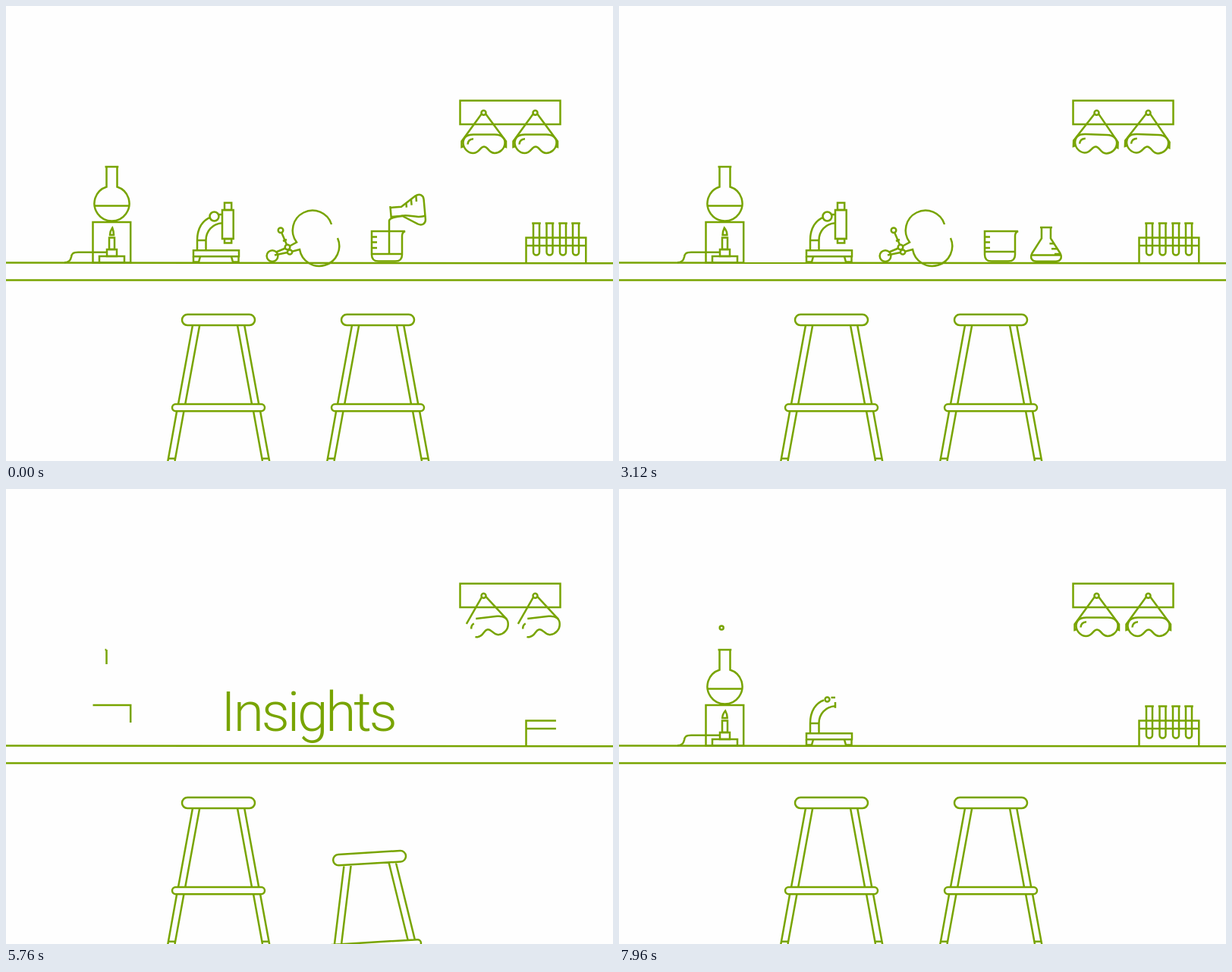
Write an HTML page that moves like this. It is 800x600 px and loops after 8000 ms.

```html
<!DOCTYPE html>
<html lang="en">
<head>
<meta charset="utf-8">
<title>Insights</title>
<style>
  html, body { margin: 0; width: 100%; height: 100%; overflow: hidden; background: #fefefe; }
  svg { display: block; width: 100vw; height: 100vh; }
  text { font: 300 73px Roboto, "Open Sans", sans-serif; letter-spacing: -3.1px; fill: #78a400; stroke: none; }
</style>
</head>
<body>
<svg id="stage" viewBox="0 0 800 600" fill="none" stroke="#78a400" stroke-width="2.5">
  <clipPath id="above"><rect width="800" height="338"/></clipPath>
  <g clip-path="url(#above)"><text id="word" x="398" y="319" text-anchor="middle">Insights</text></g>
</svg>
<script>
const NS = 'http://www.w3.org/2000/svg';
const stage = document.getElementById('stage');
const word = document.getElementById('word');
const LOOP = 8000, STEP = 40, BLANK = 3880, NEVER = 1e6;

function add(tag, parent, attrs = {}) {
  const el = document.createElementNS(NS, tag);
  for (const k in attrs) el.setAttribute(k, attrs[k]);
  return parent.appendChild(el);
}
const group = (parent = stage) => add('g', parent);
const put = (el, transform) => el.setAttribute('transform', transform);
const show = (el, on) => el.setAttribute('display', on ? 'inline' : 'none');
const ring = (x, y, r) => `M${x - r} ${y}a${r} ${r} 0 1 1 ${2 * r} 0a${r} ${r} 0 1 1 ${-2 * r} 0`;
const box = (x, y, w, h) => `M${x} ${y}h${w}v${h}h${-w}z`;
const pill = (x, y, w, r) =>
  `M${x + r} ${y}h${w - 2 * r}a${r} ${r} 0 0 1 0 ${2 * r}h${2 * r - w}a${r} ${r} 0 0 1 0 ${-2 * r}z`;
const mix = (a, b, k) => a + (b - a) * k;
function ease(t, start, dur) {
  const k = Math.min(1, Math.max(0, (t - start) / dur));
  return k * k * (3 - 2 * k);
}

// Each part is drawn in and wiped out along its own outline.
const parts = [];
function part(d, from, fromDur, to, toDur, parent = stage, centred = false) {
  const el = group(parent);
  for (const sub of d.split(/(?=M)/)) add('path', el, { d: sub, pathLength: 1 });
  parts.push({ el, from, fromDur, to, toDur, centred });
  return el;
}
const presence = (t, p) => t < BLANK ? 1 - ease(t, p.to, p.toDur) : ease(t, p.from, p.fromDur);
function trim(p, k) {
  show(p.el, k > 0);
  p.el.setAttribute('stroke-dasharray', k < 1 ? `${k} ${p.centred ? 1 - k : 2}` : 'none');
  p.el.setAttribute('stroke-dashoffset', p.centred && k < 1 ? k / 2 : 0);
}

// Bench and shelf
part('M0 338.6L800 339.2', 3920, 440, 3540, 290);
part('M0 361.4H800', 5154, 420, 3520, 290);
part('M660.5 124.8H730.5V156H598.5V124.8Z', 5257, 420, 3480, 300, stage, true);

// Goggles
const goggles = [0, 68].map(dx => {
  const outer = group();
  put(outer, `translate(${dx} 0)`);
  const el = group(outer);
  part(ring(629.5, 140.8, 3), 5331, 240, 3440, 240, el);
  part('M627 142L600.5 178.5V186L603 185M632 142L659 178.5V186L656.5 185' +
    'M616 169.6H644C654 169.6 658 175 657.5 181C657 189 650 194 644 194C636 194 635.5 185.5 630 185.5' +
    'C624.5 185.5 624 194 615.5 194C609 194 603 188 602.5 181C602.5 174 607 169.6 616 169.6Z' +
    'M608.5 182.5Q609 175.5 616 175.2', 5480, 420, 3300, 300, el);
  return el;
});

// Stools
const stools = [0, 210].map(dx => {
  const outer = group();
  put(outer, `translate(${dx} 0)`);
  const el = group(outer);
  add('path', el, { d: pill(232, 406.7, 96, 7.2) + pill(219, 525, 122, 4.6) +
    'M246 421L227 525M255.2 421L236.2 525M225.2 534L213 602M234.5 534L222.5 600' +
    'M314.2 421L333.2 525M305 421L324 525M335 534L347.5 602M326 534L338 600' +
    'M213.5 596.7H223.5M337.5 596.7H347.5' });
  return el;
});

// Round flask and burner
part(box(114.5, 285, 49.7, 53.5), 5640, 300, 3420, 300);
part('M130.5 212H148.3M132.5 212V238.5A23 23 0 1 0 146.5 238.5V212', 5700, 300, 3400, 300);
const level = part('M116.5 263.6H162.5', 5760, 240, 3400, 240);
part(box(123, 330, 33, 8.5) + box(133, 321, 13, 9) + box(136, 305.5, 7, 15.5), 5800, 280, 3420, 280);
part('M133 324.7H95C88 324.7 86.5 327 86 331C85 336 82 338.3 77 338.3', 5900, 280, 3400, 280);
const flame = add('path', stage);
const puff = add('circle', stage);

// Test tubes
part('M685.5 338.5V305.5H764.3V338.5M685.5 316H764.3', 5600, 320, 3420, 300);
const tubes = [699, 716.5, 734, 751].map((x, i) =>
  part(`M${x - 5.8} 286.5h11.6M${x - 4} 286.5v38a4 4 0 0 0 8 0v-38`, 5880 + i * 20, 220, 3400, 260));
const hops = [5, 8, 7, 8];

// Microscope
part(box(247, 322.3, 60, 8), 7560, 160, 3240, 260);
part('M247 330.3V337.5H254L256 330.3M297 330.3L299 337.5H306.5V330.3', 7600, 160, 3240, 240);
part('M252 322V309C252 292 260 282 270 278.5M263.5 322V309C263.5 297 272 287 285 286.3M252 309H263.5',
  7660, 220, 3200, 280);
const knob = add('path', stage, { d: ring(0, 0, 6), 'vector-effect': 'non-scaling-stroke' });
part('M279.5 275H285', 7800, 140, 3160, 200);
part('M285 281V307H299.7V269H285Z', 7920, 240, 3160, 260);
part(box(288, 259.6, 9.2, 9.4) + box(288, 307, 9.2, 5.5), 7980, 200, 3140, 220);

// Clamp and broken ring
part('M429 288A26.2 26.2 0 1 0 383 311.5L374 316.5M437 306A26.3 26.3 0 1 1 387 321L377 323.8' +
  ring(371, 318, 3.3) + ring(374, 324.5, 3.1) + ring(362, 295.8, 3.3) + ring(351, 329.6, 7.4) +
  'M363.3 299L370 314.8M365 310L370 308M356 324.5L368 319.5M354 328.5L371 325',
  NEVER, 1, 3160, 320);

// Beaker
part('M482 297H526Q522 298.5 522 303V328Q522 336.6 513 336.6H491Q482 336.6 482 328Z' +
  'M482 304.5H489M482 311.5H489M482 319H489', NEVER, 1, 3180, 320);
const fill = part('M482 324H522', NEVER, 1, 3160, 240);
const stream = add('path', stage);
const fizz = [[512, 306, 4.8], [508, 312, 3], [504.5, 314.5, 2.4], [513, 314.5, 2.6], [505, 321, 2.8], [511.5, 320.5, 3.2]]
  .map(([x, y, r]) => ({ x, y, r, el: add('circle', stage) }));

// Conical flask, drawn around its own centre
const flask = group();
part('M-8 -22.5H8M-6 -22.5V-8L-18.5 11.5C-22 18 -18 22.3 -13 22.3H13C18 22.3 22 18 18.5 11.5L6 -8V-22.5' +
  'M4.5 -1.2H10.5M7 5.7H14.8M11 12.5H19', NEVER, 1, 3160, 320, flask);
const wash = part('M-19 14H19', NEVER, 1, 3140, 200, flask);

function circle(el, x, y, r) {
  show(el, r > 0.05);
  el.setAttribute('cx', x);
  el.setAttribute('cy', y);
  el.setAttribute('r', Math.max(0, r));
}

function swing(t) {
  if (t < BLANK) return 2.2 * ease(t, 3000, 140) - 9 * ease(t, 3140, 220);
  const u = (t - 6240) / 1000;
  return Math.min(10, 7 * Math.exp(-2.6 * u)) * Math.cos(8.4 * u) * (1 - ease(t, 7100, 400));
}

function drawPuff(t) {
  const birth = t < BLANK ? 0 : t < 7610 ? 5740 : 7150;
  const age = (t - birth) / 1000;
  const alive = age > 0.15 && age < 1.87 && (t < BLANK || t > 5960);
  const r = alive ? Math.min(2.5, age * 9) * Math.min(1, (1.9 - age) * 12) : 0;
  circle(puff, 139.5 - 5.3 * age, 212 - 40 * age + 5 * age * age, r);
}

function drawFlame(t) {
  const k = t < BLANK ? 1 - ease(t, 3400, 200) : ease(t, 5960, 200);
  const w = 3 - 0.5 * Math.cos(t / 95);
  const lean = 0.7 * Math.cos(t / 140);
  show(flame, k > 0);
  flame.setAttribute('d', `M${-w} 0Q${-w} -5 ${lean} -9.5Q${w} -5 ${w} 0Z`);
  put(flame, `translate(139.5 302) scale(${k})`);
}

function drawPour(t) {
  const turn = ease(t, 440, 700);
  const drift = 4 * ease(t, 2980, 150);
  put(flask, `translate(${mix(529.5, 559, turn) + drift} ${mix(270, 314.5, turn)}) rotate(${-95 * (1 - turn)})`);
  put(fill, `translate(0 ${3 * (1 - ease(t, 0, 700))})`);
  const settle = Math.max(0, t - 900) / 1000;
  put(wash, `rotate(${4 * Math.exp(-2 * settle) * Math.sin(9 * settle)} 0 14)`);
  if (t < 900) show(wash, false);
  const top = mix(283, 326, ease(t, 400, 240));
  show(stream, t < 640);
  stream.setAttribute('d', t <= 400
    ? 'M553 276.5C541 281 531 274 521 277Q506 279 505 283V326'
    : `M505 ${top}V326`);
  const size = t < BLANK ? ease(t, 900, 400) * (1 - ease(t, 2160, 440)) : 0;
  fizz.forEach((b, i) => {
    const u = (t - 1680) / 1000;
    circle(b.el, b.x + Math.sin(u * 3 + i) - Math.sin(i), b.y - 4 * u, b.r * size);
  });
}

function render(t) {
  for (const p of parts) trim(p, presence(t, p));

  const rise = t < BLANK ? 1 - ease(t, 3400, 360) : 0;
  stools.forEach((el, i) => {
    const away = 1 - (rise || (t < BLANK ? 0 : ease(t, 5240 + i * 180, 460 + i * 100)));
    show(el, away < 1);
    put(el, `translate(0 ${212 * away}) rotate(${-10.1 * away} 280 595)`);
  });

  const angle = swing(t);
  goggles.forEach(el => put(el, `rotate(${angle} 629.5 140.8)`));
  put(level, `rotate(${t < BLANK ? 0 : -0.36 * angle} 139.5 263.6)`);

  const hop = Math.sin(Math.PI * Math.min(1, Math.max(0, (t - 6060) / 360)));
  tubes.forEach((el, i) => put(el, `translate(0 ${-hops[i] * hop})`));

  const size = t < BLANK ? 1 - ease(t, 3180, 220) : ease(t, 7880, 160);
  show(knob, size > 0);
  put(knob, `translate(274.5 277.5) scale(${size})`);

  const hidden = 1 - ease(t, 4180, 460) + ease(t, 7400, 360);
  show(word, hidden < 1);
  put(word, `translate(0 ${76 * hidden})`);

  drawFlame(t);
  drawPuff(t);
  drawPour(t);
}

let began;
function tick(now) {
  began ??= now;
  const t = (now - began) % LOOP;
  render(Math.floor(t / STEP) * STEP);
  requestAnimationFrame(tick);
}
render(0);
requestAnimationFrame(tick);
</script>
</body>
</html>
```
